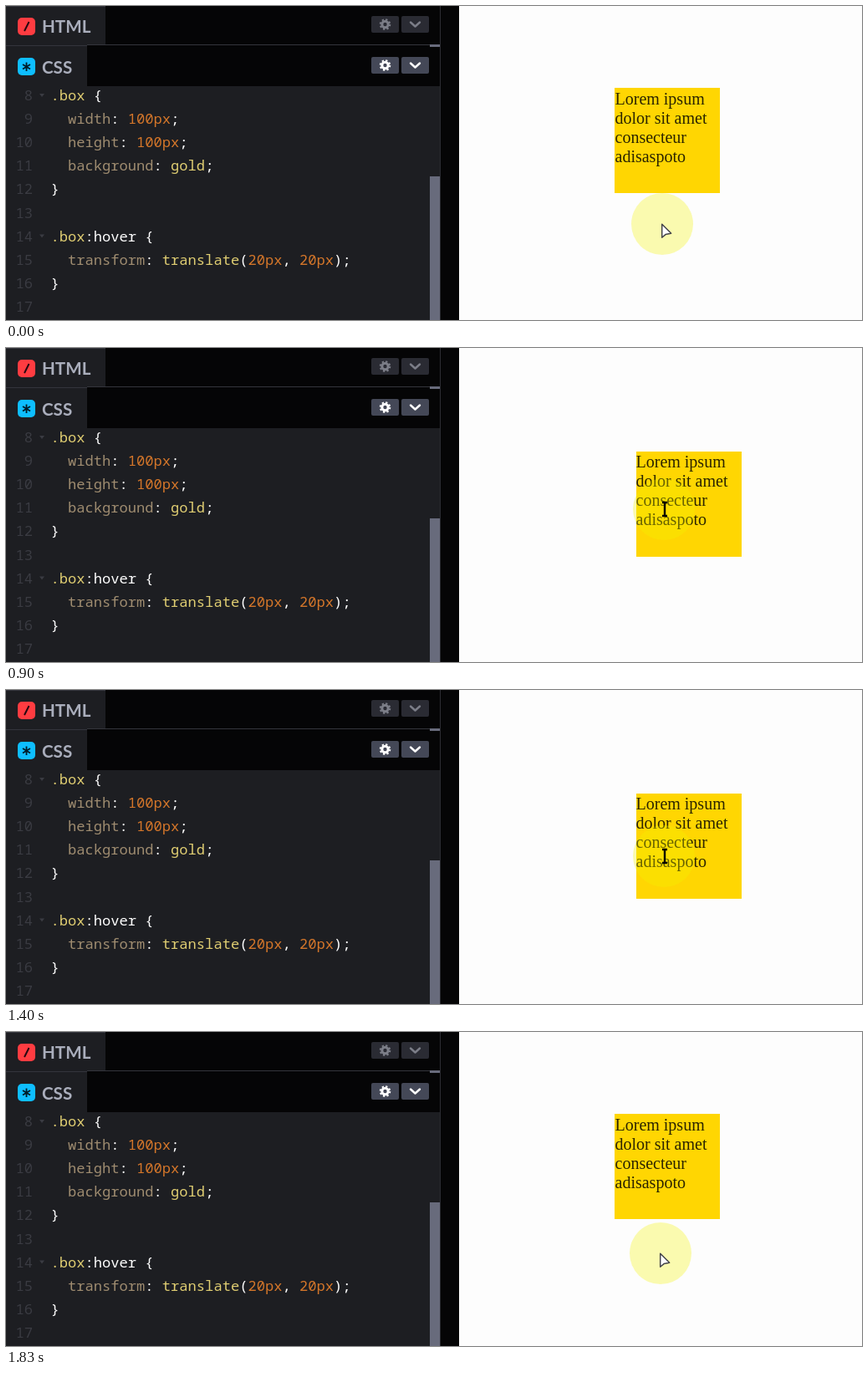
Recreate the animation shown at these times as an HTML page. Size 1024 px wide and 376 px high, loop 2110 ms.

```html
<!DOCTYPE html>
<html lang="en">
<head>
<meta charset="utf-8">
<title>Hover jump</title>
<style>
html, body { margin: 0; width: 100%; height: 100%; overflow: hidden; background: #fdfdfd; }
svg { display: block; width: 1024px; height: 376px; }
text { white-space: pre; }
.code { font: 17.1px "Noto Sans Mono", "DejaVu Sans Mono", monospace; fill: #fff; }
.num { fill: #3a3b42; text-anchor: end; }
.sel { fill: #e0ce72; }
.prop { fill: #9f8c70; }
.val { fill: #d4762a; }
.label { font: bold 20.6px Lato, sans-serif; fill: #aaaebc; }
.lorem { font: 20px "Liberation Serif", "Times New Roman", serif; fill: #2b2400; }
</style>
</head>
<body>
<svg viewBox="0 0 1024 376">
  <defs>
    <g id="buttons">
      <rect width="33" height="20" rx="2"/>
      <rect x="36" width="33" height="20" rx="2"/>
      <g fill="none" stroke="currentColor">
        <circle cx="16.5" cy="10" r="3.7" stroke-width="3"/>
        <circle cx="16.5" cy="10" r="5.8" stroke-width="2" stroke-dasharray="2.3 2.255"/>
        <path d="M47 7.5l5.5 5 5.5-5" stroke-width="2.4" stroke-linecap="round" stroke-linejoin="round"/>
      </g>
    </g>
  </defs>

  <rect width="542" height="376" fill="#050506"/>
  <g fill="#1d1e22">
    <rect width="119" height="47"/>
    <rect y="47" width="97" height="50"/>
    <rect y="96" width="519" height="280"/>
  </g>
  <path d="M0 .5H119M97 46.5H507M0 47.5H97" stroke="#34353c"/>
  <path d="M519.5 0V376" stroke="#2c2d33"/>
  <path d="M507 46h12v3h-12zM507 204h12v172h-12z" fill="#686b7c"/>

  <rect x="14" y="14" width="21" height="21" rx="5" fill="#ff3c41"/>
  <path d="M22 30L27.5 19" stroke="#240810" stroke-width="2"/>
  <rect x="14" y="62" width="21" height="21" rx="5" fill="#0ebeff"/>
  <path d="M24.5 67.5v10.5M20 70l9 5.500M29 70l-9 5.500" stroke="#001c28" stroke-width="1.8"/>
  <text class="label" x="43" y="31.5">HTML</text>
  <text class="label" x="43" y="80.5">CSS</text>
  <use href="#buttons" x="437" y="12" fill="#2a2b33" color="#7c7e88"/>
  <use href="#buttons" x="437" y="61" fill="#444857" color="#fff"/>
  <g id="code"></g>

  <rect x="542" width="482" height="376" fill="#fdfdfd"/>
  <g id="box">
    <rect x="728" y="98" width="126" height="126" fill="#ffd602"/>
    <g id="lorem"></g>
  </g>
  <g id="pointer">
    <circle r="37" fill="#f2f200" fill-opacity=".31"/>
    <path id="arrow" d="M-.3 .2V16.300L4 12.600L10.700 11.200Z" fill="#fff" stroke="#45454a" stroke-width="1.5" stroke-linejoin="round"/>
    <path id="beam" d="M-2 -8H4M1 -8V8M-2 8H4" fill="none" stroke="#000" stroke-width="2.4"/>
  </g>
</svg>
<script>
const $ = id => document.getElementById(id);

// Marked spans: s selector, p property, v value.
const kinds = { s: "sel", p: "prop", v: "val" };
const lines = [
  "{s|.box} {", "  {p|width}: {v|100px};", "  {p|height}: {v|100px};",
  "  {p|background}: {s|gold};", "}", "",
  "{s|.box}:hover {", "  {p|transform}: {s|translate}({v|20px}, {v|20px});", "}", ""
];
const paint = s => s.replace(/\{(\w)\|(.*?)\}/g, (_, k, t) => `<tspan class="${kinds[k]}">${t}</tspan>`);

$("code").innerHTML = lines.map((line, i) => {
  const y = 113 + i * 28.1;
  const fold = line.startsWith("{s|") ? `<path d="M40 ${y - 8}h6l-3 4z" fill="#3a3b42"/>` : "";
  return `<text class="code num" x="32" y="${y}">${i + 8}</text>${fold}` +
    `<text class="code" x="53.5" y="${y}">${paint(line)}</text>`;
}).join("");

$("lorem").innerHTML = ["Lorem ipsum", "dolor sit amet", "consecteur", "adisaspoto"]
  .map((s, i) => `<text class="lorem" x="728.5" y="${117.5 + i * 23}">${s}</text>`).join("");

// Pointer path: step (30 per second), x, y
const path = [
  [0, 785, 261], [3, 786, 275], [6, 787, 267], [14, 787, 267], [15, 789, 252],
  [18, 788, 207], [20, 787, 193], [22, 787, 189], [26, 787, 189], [28, 787, 197],
  [31, 786, 250], [33, 786, 259], [36, 787, 253], [39, 788, 220], [42, 787, 199],
  [45, 786, 188], [47, 785, 188], [49, 783, 199], [51, 783, 232], [53, 783, 259],
  [54, 783, 267], [55, 783, 265]
];
const LOOP = 2110;

function pointerAt(step) {
  const i = Math.max(1, path.findIndex(p => p[0] >= step));
  const [a, b] = [path[i - 1], path[i]];
  const f = (step - a[0]) / (b[0] - a[0]);
  return [1, 2].map(n => a[n] + (b[n] - a[n]) * f);
}

function draw(now) {
  const t = now % LOOP;
  const step = Math.min(55, Math.floor((t + 5) * 0.03));
  const [x, y] = pointerAt(step);
  const hover = (step >= 18 && step < 32) || (step >= 40 && step < 52);
  const onText = hover && y < 216;
  $("box").setAttribute("transform", hover ? "translate(26 26)" : "");
  $("lorem").setAttribute("transform", hover ? "translate(-1 -1)" : "");
  $("pointer").setAttribute("transform", `translate(${x} ${y})`);
  $("arrow").style.display = onText ? "none" : "";
  $("beam").style.display = onText ? "" : "none";
}

const start = performance.now();
function tick() {
  draw(performance.now() - start);
  requestAnimationFrame(tick);
}
tick();
</script>
</body>
</html>
```
